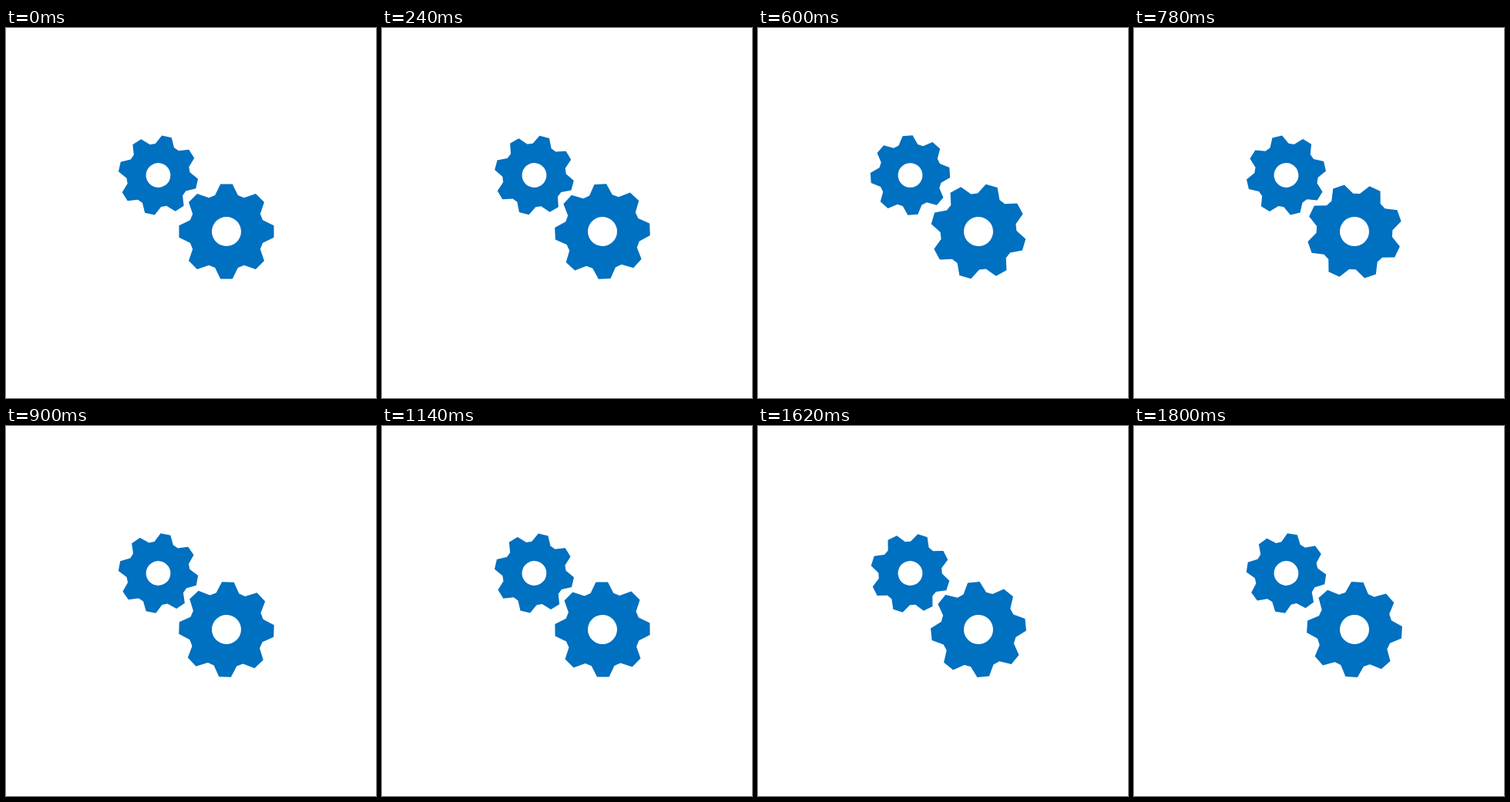
Write an HTML page that moves like this. It is 480 by 480 pixels and loops after 1860 ms.

```html
<!DOCTYPE html>
<html lang="en">
<head>
<meta charset="utf-8">
<title>Gears</title>
<style>
  html, body { margin: 0; height: 100%; overflow: hidden; background: #fff; }
  svg { display: block; width: 100vw; height: 100vh; }
</style>
</head>
<body>
<svg viewBox="0 0 480 480" fill="#0070c0">
  <path id="small"/>
  <path id="large"/>
</svg>
<script>
const STEP = 60, LOOP = 1860, TURN = 11.88; // ms, ms, degrees per step
const TEETH = 8;

// Unit: the large gear's size. Each tooth is a trapezoid; the hole is cut by even-odd fill.
function gearPath() {
  const corners = [[-17.5, 49.4], [-7.2, 62], [7.2, 62], [17.5, 49.4]];
  const points = [];
  for (let i = 0; i < TEETH; i++) {
    for (const [offset, r] of corners) {
      const a = (i * 360 / TEETH + offset) * Math.PI / 180;
      points.push(`${(r * Math.sin(a)).toFixed(2)} ${(-r * Math.cos(a)).toFixed(2)}`);
    }
  }
  return `M${points.join('L')}ZM-19 0a19 19 0 1 0 38 0a19 19 0 1 0-38 0Z`;
}

const gears = [
  { id: 'small', x: 197.5, y: 191, scale: 0.835, start: 12.4, dir: 1 },
  { id: 'large', x: 286, y: 264, scale: 1, start: 0, dir: -1 },
];

for (const gear of gears) {
  gear.el = document.getElementById(gear.id);
  gear.el.setAttribute('d', gearPath());
  gear.el.setAttribute('fill-rule', 'evenodd');
}

const begin = performance.now();

function draw(now) {
  const step = Math.floor(Math.max(0, now - begin) % LOOP / STEP);
  for (const { el, x, y, scale, start, dir } of gears) {
    const angle = start + dir * TURN * step;
    el.setAttribute('transform', `translate(${x} ${y}) rotate(${angle}) scale(${scale})`);
  }
  requestAnimationFrame(draw);
}
draw(begin);
</script>
</body>
</html>
```
